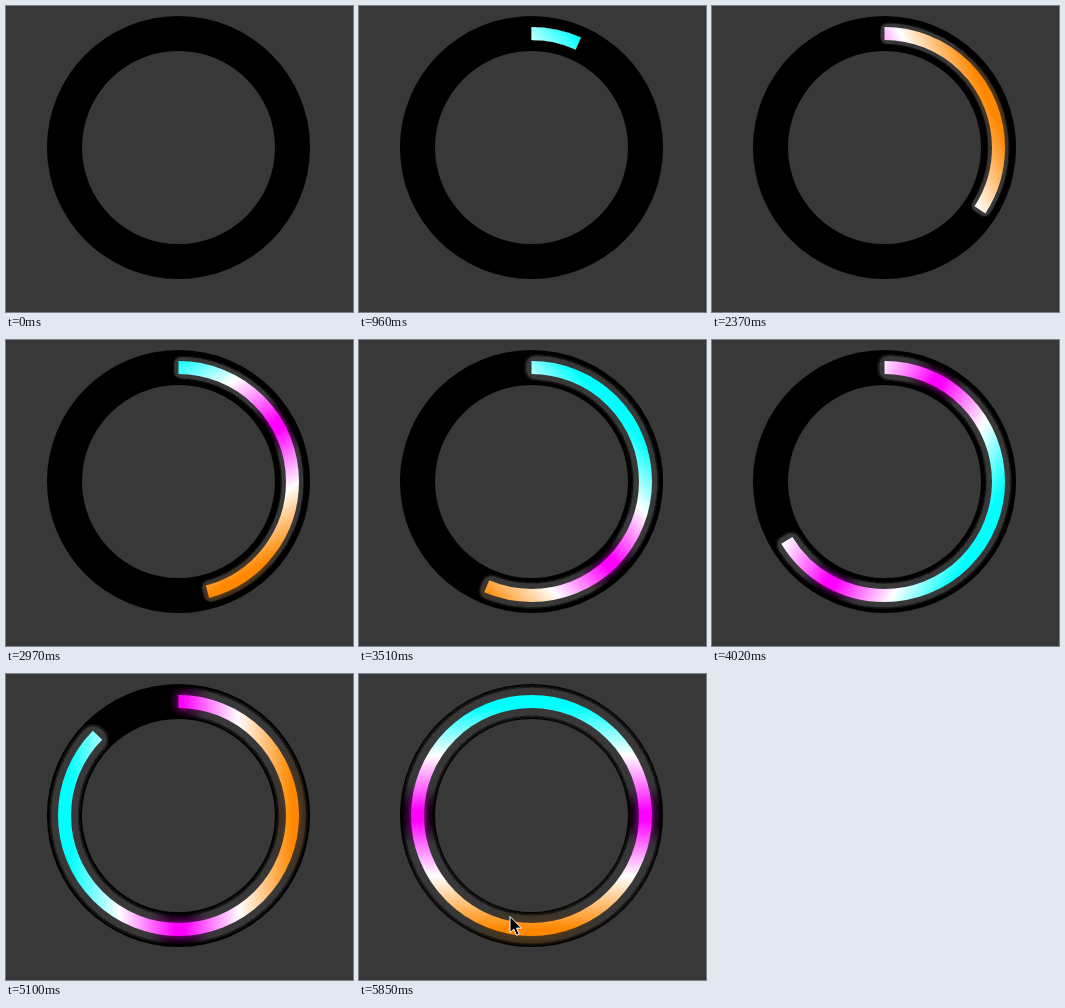
An HTML page that plays this animation: 347x306 px, repeating every 6420 ms.

```html
<!DOCTYPE html>
<html lang="en">
<head>
<meta charset="utf-8">
<title>Glowing progress ring</title>
<style>
html, body { margin: 0; width: 100%; height: 100%; overflow: hidden; background: #383838; }
svg { display: block; width: 347px; height: 306px; }
.arc { fill: none; stroke-width: 13; }
</style>
</head>
<body>
<svg viewBox="0 0 347 306">
  <defs>
    <g id="axis"></g>
    <linearGradient id="color" class="spin" gradientUnits="userSpaceOnUse" x1="172.5" x2="172.5" y1="21" y2="262">
      <stop offset=".05" stop-color="#0ff"/>
      <stop offset=".25" stop-color="#fff"/>
      <stop offset=".48" stop-color="#f0f"/>
      <stop offset=".52" stop-color="#f0f"/>
      <stop offset=".75" stop-color="#fff"/>
      <stop offset=".97" stop-color="#f80"/>
    </linearGradient>
    <linearGradient id="dim" class="spin" gradientUnits="userSpaceOnUse" x1="172.5" x2="172.5" y1="21" y2="262">
      <stop offset=".38" stop-color="#383838"/>
      <stop offset=".46" stop-color="#100010"/>
      <stop offset=".54" stop-color="#100010"/>
      <stop offset=".62" stop-color="#383838"/>
      <stop offset=".9" stop-color="#383838"/>
      <stop offset="1" stop-color="#3c2e1c"/>
    </linearGradient>
    <linearGradient id="pink" class="spin" gradientUnits="userSpaceOnUse" x1="172.5" x2="172.5" y1="21" y2="262">
      <stop offset=".36" stop-color="#f0f" stop-opacity="0"/>
      <stop offset=".47" stop-color="#f0f" stop-opacity=".75"/>
      <stop offset=".53" stop-color="#f0f" stop-opacity=".75"/>
      <stop offset=".64" stop-color="#f0f" stop-opacity="0"/>
      <stop offset=".92" stop-color="#f80" stop-opacity="0"/>
      <stop offset="1" stop-color="#f80" stop-opacity=".35"/>
    </linearGradient>
    <filter id="halo" filterUnits="userSpaceOnUse" x="0" y="0" width="347" height="306" color-interpolation-filters="sRGB">
      <feGaussianBlur class="blur"/>
      <feComponentTransfer><feFuncA type="linear" slope="14"/></feComponentTransfer>
    </filter>
    <filter id="soft" filterUnits="userSpaceOnUse" x="0" y="0" width="347" height="306" color-interpolation-filters="sRGB">
      <feGaussianBlur class="blur"/>
    </filter>
    <path id="ring" d="M172.5 10a131.5 131.5 0 1 1 0 263a131.5 131.5 0 1 1 0-263ZM172.5 45a96.5 96.5 0 1 0 0 193a96.5 96.5 0 1 0 0-193Z"/>
    <clipPath id="band"><use href="#ring" clip-rule="evenodd"/></clipPath>
    <path id="track" pathLength="360" d="M172.5 27.5a114 114 0 1 1 0 228a114 114 0 1 1 0-228"/>
  </defs>
  <rect width="347" height="306" fill="#383838"/>
  <use href="#ring" fill-rule="evenodd"/>
  <g id="progress">
    <g clip-path="url(#band)">
      <g filter="url(#halo)"><use href="#track" class="arc" stroke="url(#dim)"/></g>
      <g filter="url(#soft)"><use href="#track" class="arc" stroke="url(#pink)"/></g>
    </g>
    <use href="#track" class="arc" stroke="url(#color)"/>
  </g>
  <path id="cursor" d="M0 0V16L3.8 12.6L6.6 18.8L9.2 17.6L6.5 11.6H11.5Z" fill="#000" stroke="#fff" stroke-width="1"/>
</svg>
<script>
const LOOP = 6420, STEP = 30, START = 615, END = 5745;
const $ = id => document.getElementById(id);
const spins = document.querySelectorAll('.spin');
const blurs = document.querySelectorAll('.blur');
const clamp = v => Math.max(0, Math.min(1, v));
$('axis').remove();

function draw(ms) {
  const t = Math.floor(ms % LOOP / STEP) * STEP;
  const p = clamp((t - START) / (END - START));
  const angle = 360 * p;

  $('progress').style.display = p > 0 ? '' : 'none';
  $('track').setAttribute('stroke-dasharray', p < 1 ? `${angle} 400` : 'none');
  // The colours turn twice while the arc closes once.
  for (const g of spins) g.setAttribute('gradientTransform', `rotate(${2 * angle} 172.5 141.5)`);
  for (const b of blurs) b.setAttribute('stdDeviation', 0.4 + 4.6 * p);

  const q = clamp((t - 5760) / 90);
  const rest = (1 - q) ** 2;
  $('cursor').style.display = t >= 5760 ? '' : 'none';
  $('cursor').setAttribute('transform', `translate(${151 + 7 * rest} ${242.5 + 33 * rest})`);
}

const begin = performance.now();
function tick() {
  draw(performance.now() - begin);
  requestAnimationFrame(tick);
}
tick();
</script>
</body>
</html>
```
